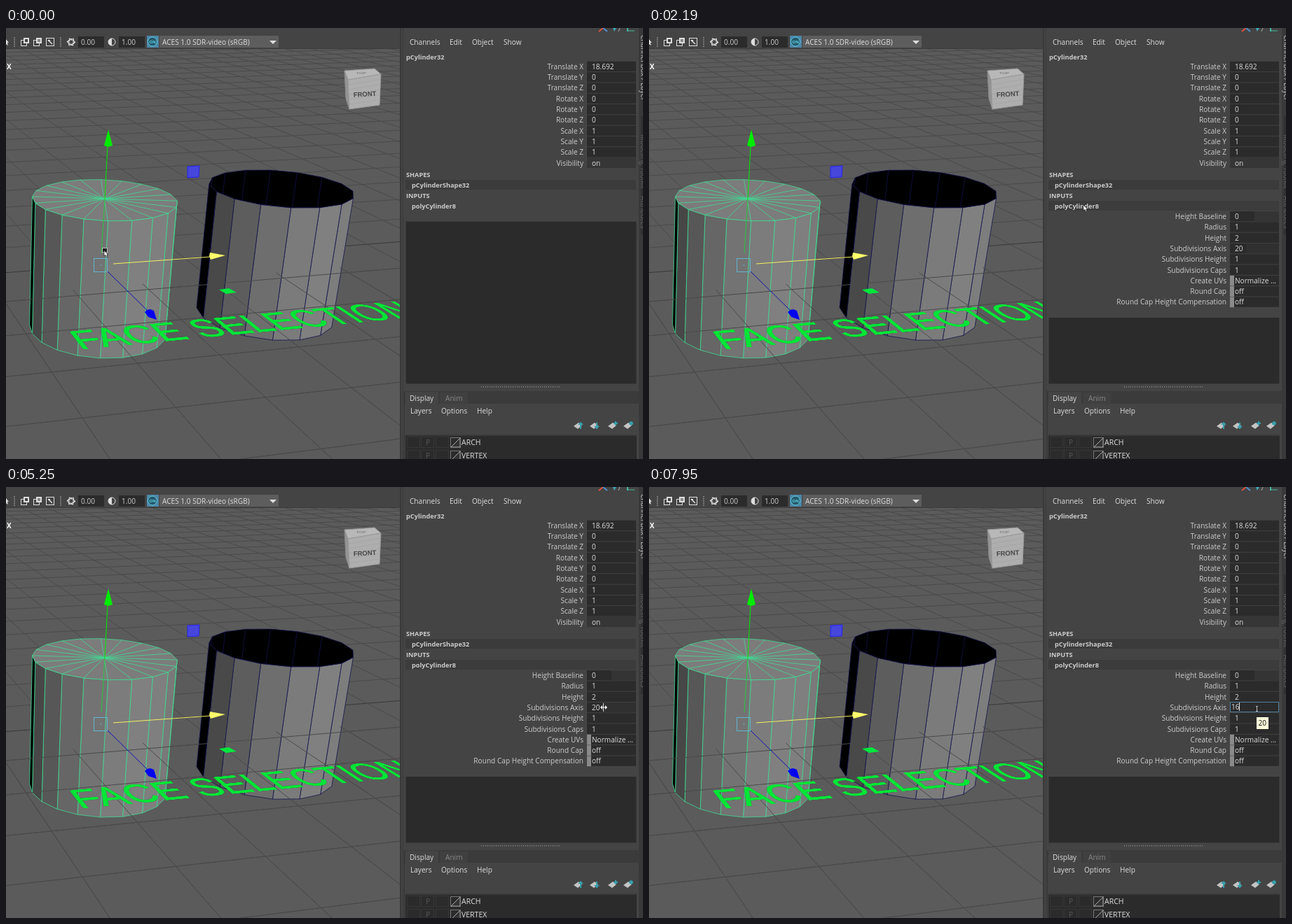
Write an HTML page with a canvas that moves like this. It is 909 px wide and 616 px high and loops after 8000 ms.

```html
<!DOCTYPE html>
<html lang="en">
<head>
<meta charset="utf-8">
<title>Cylinder subdivisions</title>
<style>
html, body { margin: 0; width: 100%; height: 100%; overflow: hidden; background: #444; }
canvas, #view { position: absolute; left: 0; top: 0; }
#view { width: 562px; height: 616px; overflow: hidden; }
#ground {
  position: absolute; left: 0; top: 0; transform-origin: 0 0; white-space: pre;
  font: 100px/100px "Liberation Sans", sans-serif; color: #00e636;
  -webkit-text-stroke: 2px #00e636; text-shadow: 0 0 3px #002208;
}
</style>
</head>
<body>
<canvas id="base" width="909" height="616"></canvas>
<div id="view"><div id="ground">FACE SELECTION</div></div>
<canvas id="live" width="909" height="616"></canvas>
<script>
const base = document.getElementById('base').getContext('2d');
const live = document.getElementById('live').getContext('2d');
const FONT = '10.1px "Open Sans", sans-serif';
const BOLD = 'bold 9.2px "Open Sans", sans-serif';
let g = base;

function rect(x, y, w, h, color) {
  g.fillStyle = color;
  g.fillRect(x, y, w, h);
}
function frame(x, y, w, h, color) {
  g.strokeStyle = color;
  g.lineWidth = 1;
  g.strokeRect(x + .5, y + .5, w - 1, h - 1);
}
function text(s, x, mid, color = '#ccc', font = FONT, align = 'left') {
  g.font = font;
  g.textAlign = align;
  g.fillStyle = color;
  g.fillText(s, x, mid + 3.8);
}
function poly(pts, fill, stroke, width = 1) {
  g.beginPath();
  pts.forEach(p => g.lineTo(...p));
  g.closePath();
  if (fill) { g.fillStyle = fill; g.fill(); }
  if (stroke) { g.strokeStyle = stroke; g.lineWidth = width; g.stroke(); }
}
function line(a, b, color, width = 1) {
  g.beginPath();
  g.moveTo(...a);
  g.lineTo(...b);
  g.strokeStyle = color;
  g.lineWidth = width;
  g.stroke();
}
function disc(x, y, r, fill, stroke) {
  g.beginPath();
  g.arc(x, y, r, 0, 7);
  if (fill) { g.fillStyle = fill; g.fill(); }
  if (stroke) { g.strokeStyle = stroke; g.lineWidth = 1; g.stroke(); }
}

// Perspective: homogeneous axis vectors, relative to the selected pivot
const axis = (k, x, y) => [k * x, k * y, k];
const AX = axis(.015, 6400, -153), AY = axis(-.0301, -30, 3400), AZ = axis(-.0705, -365, -153);
const ORIGIN = [135, 339, 1];
const mix = (x, y, z) => ORIGIN.map((o, i) => o + x * AX[i] + y * AY[i] + z * AZ[i]);
function project(x, y, z) {
  const [px, py, w] = mix(x, y, z);
  return [px / w, py / w];
}

function grid(zFrom, zStart) {
  for (let z = zFrom; z <= 6; z++)
    line(project(-10, 0, z), project(45, 0, z), z ? '#4a4a4a' : '#383838');
  for (let k = -5; k <= 40; k++)
    line(project(k - .692, 0, zStart), project(k - .692, 0, 6), '#4a4a4a');
}

function cylinder(cx, n, wire, capped) {
  const ring = y => Array.from({ length: n }, (_, i) => {
    const a = i * 2 * Math.PI / n;
    return project(cx + Math.cos(a), y, Math.sin(a));
  });
  const top = ring(1), bottom = ring(-1);
  for (let i = 0; i < n; i++) {
    const j = (i + 1) % n, [t, u, b] = [top[i], top[j], bottom[i]];
    const facing = (u[0] - t[0]) * (b[1] - t[1]) - (u[1] - t[1]) * (b[0] - t[0]);
    if (facing >= 0) continue;
    const lit = Math.cos((i + .5) * 2 * Math.PI / n - 1.31);
    const v = lit > -.2 ? Math.round(76 + 52 * lit) : 0;
    poly([t, u, bottom[j], b], `rgb(${v},${v},${v})`, wire, .8);
  }
  poly(top, capped ? '#7c7c7c' : '#000', wire, .8);
  g.save();
  poly(top);
  g.clip();
  const center = project(cx, 1, 0);
  top.forEach((p, i) => {
    if (capped) line(center, p, wire, .8);
    else if (i >= n / 2) line(p, bottom[i], wire, .8);
  });
  g.restore();
}

function manipulator() {
  line([136, 322], [141, 245], '#28c840');
  line([141, 245], [145, 168], '#00f000');
  poly([[140, 168], [146, 145], [152, 168], [146, 170]], '#00ec00');
  line([153, 337], [292, 327], '#f4f060');
  poly([[291, 321], [313, 325], [292, 331], [290, 326]], '#ffff6a');
  line([145, 348], [202, 404], '#1010b0');
  poly([[198, 406], [201, 403], [206, 402], [211, 404], [215, 417], [203, 413]], '#0000f0');
  poly([[259, 198], [276, 197], [275, 213], [259, 214]], '#4646dc', '#2424f0');
  poly([[304, 374], [318, 372], [329, 378], [314, 380]], '#00e83c');
  frame(125, 329, 20, 20, '#62b4cf');
  rect(135, 338, 1, 2, '#62b4cf');
}

function viewCube() {
  poly([[483, 61], [488, 74], [490, 116], [485, 101]], '#949494', '#8a8a8a');
  poly([[483, 61], [526, 58], [535, 66], [488, 74]], '#b8b8b8', '#959595');
  poly([[488, 74], [535, 66], [533, 110], [490, 116]], '#aeaeae', '#999');
  for (let i = 1; i < 6; i++)
    line([489, 74 + i * 7], [534, 66 + i * 7.3], '#a6a6a6');
  g.save();
  g.translate(512, 94);
  g.rotate(-.06);
  text('FRONT', 0, 0, '#454545', 'bold 9.5px "Liberation Sans", sans-serif', 'center');
  g.restore();
  g.save();
  g.translate(507, 64);
  g.scale(1, .5);
  text('TOP', 0, 0, '#666', '7px "Liberation Sans", sans-serif', 'center');
  g.restore();
}

function toolbar() {
  rect(0, 0, 562, 30, '#444');
  rect(0, 29, 562, 1, '#3c3c3c');
  poly([[0, 16], [4, 21], [2, 21], [3, 25], [0, 23]], '#ddd');
  for (const x of [11, 77])
    for (let y = 13; y < 28; y += 3) rect(x, y, 2, 2, '#777');
  for (const x of [21, 39]) {
    frame(x, 17, 9, 9, '#ddd');
    rect(x + 4, 14, 8, 8, '#ddd');
    rect(x + 6, 16, 4, 4, x < 30 ? '#444' : '#888');
  }
  frame(57, 14, 12, 12, '#ddd');
  line([60, 17], [66, 23], '#ddd', 1.5);
  rect(60, 17, 3, 2, '#ddd');
  disc(93, 20, 4.5, null, '#ddd');
  for (let i = 0; i < 6; i++) {
    const a = i * Math.PI / 3;
    line([93 + 6 * Math.cos(a), 20 + 6 * Math.sin(a)],
         [93 + 3 * Math.cos(a + 1), 20 + 3 * Math.sin(a + 1)], '#ddd', 1.5);
  }
  rect(103, 12, 37, 16, '#2b2b2b');
  text('0.00', 107, 20);
  disc(151, 20, 5, null, '#ddd');
  g.beginPath();
  g.arc(151, 20, 5, Math.PI / 2, -Math.PI / 2);
  g.fillStyle = '#ddd';
  g.fill();
  rect(161, 12, 37, 16, '#2b2b2b');
  text('1.00', 165, 20);
  rect(201, 11, 17, 17, '#4e86a8');
  disc(209, 19.5, 6.5, '#26586c', '#5cd0e0');
  text('ON', 209, 18.5, '#5cd0e0', 'bold 6px "Open Sans", sans-serif', 'center');
  rect(219, 11, 170, 17, '#5d5d5d');
  text('ACES 1.0 SDR-video (sRGB)', 223, 20, '#ddd');
  poly([[376, 18], [386, 18], [381, 23]], '#ddd');
}

const rowY = i => 55 + i * 15.3;
function attribute(y, label, value, x = 836) {
  text(label, 824, y, '#ccc', FONT, 'right');
  rect(829, y - 7.2, 70, 14.4, '#2b2b2b');
  text(value, x, y, '#ddd');
}

function panel() {
  rect(562, 0, 347, 616, '#444');
  rect(562, 0, 2, 616, '#393939');
  rect(566, 0, 1, 616, '#3a3a3a');
  rect(903, 0, 6, 616, '#393939');
  rect(906, 126, 3, 170, '#303030');
  g.save();
  g.translate(906, 10);
  g.rotate(Math.PI / 2);
  text('Channel Box / Layer', 0, -4, '#bbb');
  text('Modeling Toolkit    Attributes', 142, -4, '#666');
  g.restore();

  line([846, 5], [852, 0], '#e05040', 2);
  line([852, 0], [858, 5], '#4a90d0', 2);
  poly([[866, 0], [871, 0], [868, 5]], '#3fa6b5');
  line([876, 0], [874, 5], '#aaa');
  line([887, 0], [887, 5], '#45b5a0', 2);
  line([887, 4], [897, 4], '#45b5a0');

  [['Channels', 576], ['Edit', 633], ['Object', 665], ['Show', 710]]
    .forEach(([s, x]) => text(s, x, 20, '#ddd'));
  text('pCylinder32', 571, 41, '#ccc', BOLD);
  const names = ['Translate', 'Rotate', 'Scale'].flatMap(s => ['X', 'Y', 'Z'].map(a => s + ' ' + a));
  names.forEach((s, i) => attribute(rowY(i), s, i === 0 ? '18.692' : i > 5 ? '1' : '0'));
  attribute(rowY(9), 'Visibility', '');
  rect(829, rowY(9) - 7.2, 70, 14.4, '#363636');
  text('on', 836, rowY(9), '#ddd');
  text('SHAPES', 571, 209, '#ccc', BOLD);
  rect(570, 217, 329, 14, '#3b3b3b');
  text('pCylinderShape32', 579, 224, '#ccc', BOLD);
  text('INPUTS', 571, 239.5, '#ccc', BOLD);
  text('polyCylinder8', 579, 254.5, '#ccc', BOLD);
  rect(570, 276, 330, 233, '#2b2b2b');
  frame(570, 276, 330, 233, '#3a3a3a');
}

function layerEditor() {
  for (let x = 678; x < 790; x += 3) rect(x, 512, 1, 1.5, '#888');
  rect(568, 519, 335, 18, '#3b3b3b');
  rect(570, 520, 47, 18, '#444');
  rect(619, 521, 40, 16, '#404040');
  rect(568, 519, 1, 97, '#343434');
  text('Display', 576, 529, '#ddd');
  text('Anim', 627, 529, '#888');
  [['Layers', 577], ['Options', 621], ['Help', 672]].forEach(([s, x]) => text(s, x, 547, '#ddd'));
  [817, 840, 866, 888].forEach((x, i) => {
    poly([[x - 7, 569], [x, 564], [x + 5, 568], [x - 1, 573]], '#c4c4c4');
    if (i < 2) {
      const d = i ? 1 : -1;
      rect(x + 2, 564, 2, 9, '#36a0ad');
      poly([[x - 1, 568 + d], [x + 7, 568 + d], [x + 3, 568 + 5 * d]], '#36a0ad');
    } else if (i === 2) {
      rect(x + 1, 564, 6, 2, '#36a0ad');
      rect(x + 3, 562, 2, 6, '#36a0ad');
    } else disc(x + 4, 565, 2.8, '#36a0ad');
  });
  rect(570, 581, 330, 35, '#2b2b2b');
  line([570, 582], [900, 582], '#4a4a4a');
  ['ARCH', 'VERTEX'].forEach((s, i) => {
    const y = 592 + 19 * i;
    for (const x of [572, 592, 613]) frame(x, y - 8, 19, 16, '#363636');
    text('P', 602, y, '#585858', FONT, 'center');
    poly([[635, y + 7], [648, y - 6], [648, y + 7]], '#333', '#aaa');
    frame(634, y - 7, 15, 15, '#777');
    text(s, 650, y, '#ddd', '10.5px "Open Sans", sans-serif');
  });
}

function drawBase() {
  rect(0, 0, 562, 616, '#5b5b5b');
  g.save();
  g.beginPath();
  g.rect(0, 30, 562, 586);
  g.clip();
  grid(-40, -40);
  cylinder(2.7, 16, '#14144e', false);
  cylinder(0, 20, '#40dc94', true);
  grid(1, .8);
  manipulator();
  viewCube();
  g.restore();
  text('X', 1, 55, '#fff', 'bold 10px "Open Sans", sans-serif');
  toolbar();
  panel();
  layerEditor();
}

// Lay the text on the ground plane
function placeGroundText() {
  const sx = .00527, sz = .00698;
  const col = ([x, y, w]) => [x, y, 0, w];
  const m = [col(AX.map(v => v * sx)), col(AZ.map(v => v * sz)), [0, 0, 1, 0], col(mix(-1.2, 0, 1.939))];
  document.getElementById('ground').style.transform =
    `matrix3d(${m.flat().map(v => v.toFixed(8)).join()})`;
}

// Pointer stops: time, x, y, kind
const STOPS = [
  [0, 136, 313, 'pick'], [580, 186, 290, 'pick'], [700, 243, 262, 'pick'],
  [850, 415, 255, 'pick'], [1000, 526, 250, 'pick'],
  [1150, 575, 251, 'arrow'], [1270, 606, 252, 'arrow'], [1390, 620, 253, 'arrow'],
  [3310, 632, 256, 'arrow'], [3430, 660, 263, 'arrow'], [3550, 685, 269, 'arrow'],
  [3700, 735, 282, 'arrow'], [3820, 772, 291, 'arrow'],
  [3970, 795, 302, 'arrow'], [4090, 808, 310, 'arrow'], [4210, 813, 314, 'arrow'],
  [4740, 825, 312, 'arrow'], [4860, 844.5, 315, 'slide'], [5010, 853, 315, 'slide'],
  [5370, 853, 315, 'beam'], [5930, 860, 316, 'beam'], [6050, 867, 317, 'beam']
];

function arrow(x, y) {
  poly([[0, 0], [0, 8], [2, 6.5], [3.5, 9.5], [5, 9], [3.7, 6], [6, 6]].map(p => [p[0] + x, p[1] + y]),
    '#fff', '#111', .7);
}
const POINTERS = {
  arrow,
  pick(x, y) {
    rect(x + 1, y + 1, 8, 7, '#222');
    frame(x + 1, y + 1, 8, 7, '#bbb');
    arrow(x + 4, y + 5);
  },
  slide(x, y) {
    rect(x - 1, y - 6, 1, 12, '#ddd');
    rect(x - 4, y - .5, 8, 1, '#fff');
    poly([[x - 5, y], [x - 2, y - 3], [x - 2, y + 3]], '#fff');
    poly([[x + 5, y], [x + 2, y - 3], [x + 2, y + 3]], '#fff');
  },
  beam(x, y) {
    rect(x, y - 4, 1, 8, '#bbb');
    rect(x - 1, y - 4, 3, 1, '#bbb');
    rect(x - 1, y + 3, 3, 1, '#bbb');
  }
};

function tooltip(s, x, y, w, h, tx) {
  rect(x, y, w, h, '#ffffdc');
  text(s, tx, y + h / 2, '#111');
}

function inputs() {
  rect(570, 247, 329, 14, '#3c3c3c');
  text('polyCylinder8', 579, 254.5, '#ccc', BOLD);
  rect(570, 262, 330, 152, '#444');
  const rows = [['Height Baseline', '0'], ['Radius', '1'], ['Height', '2'], ['Subdivisions Axis', '20'],
    ['Subdivisions Height', '1'], ['Subdivisions Caps', '1'], ['Create UVs', 'Normalize ...'],
    ['Round Cap', 'off'], ['Round Cap Height Compensation', 'off']];
  rows.forEach(([label, value], i) => {
    const y = rowY(i + 14);
    attribute(y, label, value);
    if (i === 0) rect(864, y - 7.2, 35, 14.4, '#343434');
    if (i === 3) rect(853, y - 7.2, 46, 14.4, '#303030');
    if (i > 5) rect(829, y - 7.2, 6, 14.8, '#8a8a8a');
  });
}

function editField(t) {
  rect(829, 307, 70, 15, '#2b2b2b');
  frame(829, 307, 70, 15, '#4f7f9e');
  const selected = t >= 5530 && t < 7350;
  if (selected) rect(831, 309, 12, 12, '#5285a6');
  text(t < 7350 ? '20' : t < 7950 ? '1' : '16', 831, 314.6, selected ? '#fff' : '#ddd');
  const caretOn = t < 5930 || (t >= 6610 && t < 7200) || t >= 7350;
  if (caretOn) rect(t >= 7350 && t < 7950 ? 837 : 842, 308, 1, 12, '#ddd');
}

function draw(t) {
  g.clearRect(0, 0, 909, 616);
  if (t >= 2190) inputs();
  if (t >= 5370) editField(t);
  if (t >= 2040 && t < 2190) tooltip('polyCylinder8', 621, 264, 76, 16, 631);
  if (t >= 6610) tooltip('20', 867, 329, 17, 17, 869.5);
  const [, x, y, kind] = STOPS.findLast(s => s[0] <= t);
  POINTERS[kind](x, y);
}

drawBase();
placeGroundText();
g = live;
const start = performance.now();
function tick() {
  draw((performance.now() - start) % 8000);
  requestAnimationFrame(tick);
}
tick();
</script>
</body>
</html>
```
